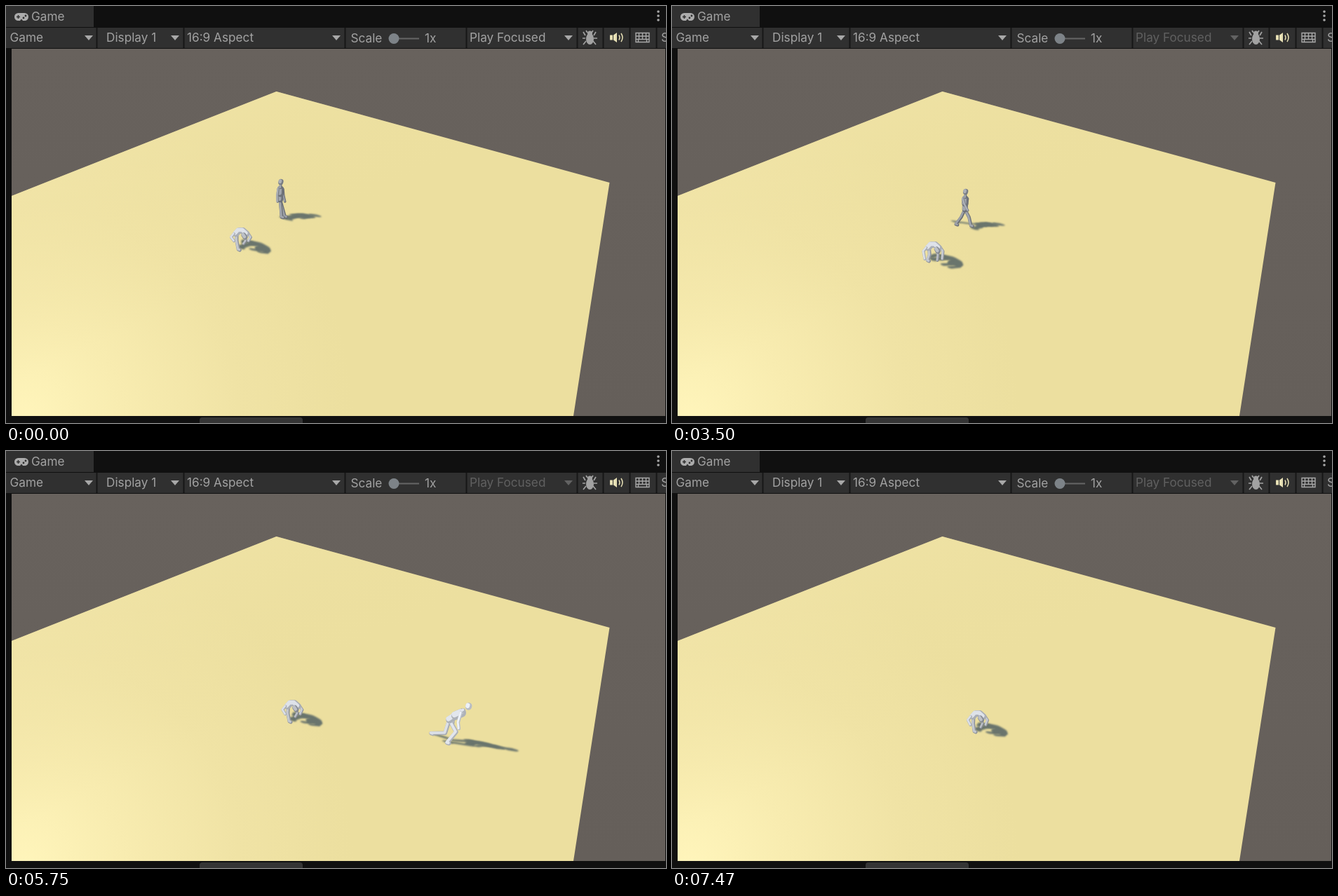
An HTML page with a canvas that plays this animation: 941x595 px, repeating every 7530 ms.

```html
<!DOCTYPE html>
<html lang="en">
<head>
<meta charset="utf-8">
<title>Game view</title>
<style>
html, body { margin: 0; width: 100%; height: 100%; overflow: hidden; background: #101010; }
svg, canvas { position: absolute; left: 0; top: 0; display: block; }
text { font: 17.2px Inter, Roboto, sans-serif; fill: #a2a2a2; }
</style>
</head>
<body>
<svg width="941" height="595" viewBox="0 0 941 595">
  <defs>
    <radialGradient id="sun" gradientUnits="userSpaceOnUse" cx="25" cy="590" r="470">
      <stop offset="0" stop-color="#fff5bb"/>
      <stop offset=".3" stop-color="#f8ecb0"/>
      <stop offset=".65" stop-color="#f0e3a5"/>
      <stop offset="1" stop-color="#ecdf9f"/>
    </radialGradient>
    <linearGradient id="haze" x1="0" y1="0" x2=".45" y2=".5">
      <stop offset="0" stop-color="#f4e8ae" stop-opacity=".8"/>
      <stop offset="1" stop-color="#ecdf9f" stop-opacity="0"/>
    </linearGradient>
    <linearGradient id="sky" x1="0" y1="0" x2="0" y2="1">
      <stop offset="0" stop-color="#68625d"/>
      <stop offset="1" stop-color="#655f5a"/>
    </linearGradient>
    <path id="arrow" d="M-6-3H6L0 4Z"/>
    <path id="floor" d="M8 270.900L385.500 122L860.500 252L809 585H8Z"/>
  </defs>

  <rect width="941" height="595" fill="#101010"/>
  <path d="M0 0H125V30H0Z" fill="#303030"/>
  <path d="M0 31H941V60H0Z" fill="#303030"/>
  <path d="M129.500 31V60M253.500 31V60M483.500 31V60M656.500 31V60M814.500 31V60M851.500 31V60M889.500 31V60M927.500 31V60" stroke="#171717" stroke-width="2"/>
  <rect x="276" y="587" width="147" height="14" rx="4" fill="#353535"/>

  <rect x="8" y="61" width="932" height="524" fill="url(#sky)"/>
  <use href="#floor" fill="url(#sun)"/>
  <use href="#floor" fill="url(#haze)"/>

  <text x="36" y="21">Game</text>
  <text x="5.500" y="51">Game</text>
  <text x="143" y="51">Display 1</text>
  <text x="258" y="51">16:9 Aspect</text>
  <text x="491.500" y="52">Scale</text>
  <text x="597" y="52">1x</text>
  <text x="934" y="51">S</text>
  <g fill="#a8a8a8">
    <use href="#arrow" x="118" y="45"/>
    <use href="#arrow" x="241" y="45"/>
    <use href="#arrow" x="471" y="45"/>
    <g id="play">
      <text x="661" y="51">Play Focused</text>
      <use href="#arrow" x="802" y="45"/>
    </g>
    <circle cx="930" cy="8" r="1.800"/>
    <circle cx="930" cy="14" r="1.800"/>
    <circle cx="930" cy="20" r="1.800"/>
  </g>
  <path d="M553 46.500H589" stroke="#666" stroke-width="2"/>
  <circle cx="553" cy="46.500" r="7.500" fill="#7d8388"/>

  <!-- gamepad -->
  <rect x="12" y="10" width="20" height="11" rx="5.500" fill="#acacac"/>
  <path d="M15 15.500H20M17.500 13V18" stroke="#303030" stroke-width="1.600"/>
  <circle cx="25" cy="17" r="1.400" fill="#303030"/>
  <circle cx="28" cy="14" r="1.400" fill="#303030"/>
  <path d="M19.500 21.500L22 18.500L24.500 21.500Z" fill="#303030"/>

  <!-- bug -->
  <g stroke="#a2a2a2" stroke-width="1.700" fill="none">
    <path d="M826 42L823 37M838 42L841 37M826 46H822M838 46H843M827 50L823 55M837 50L841 55M829 38L827 35M835 38L837 35"/>
    <ellipse cx="832.500" cy="47" rx="5.500" ry="8" fill="#a2a2a2" stroke="none"/>
    <circle cx="832.500" cy="39" r="3.500" fill="#a2a2a2" stroke="none"/>
  </g>

  <!-- speaker -->
  <path d="M861 41.500H865V48.500H861ZM866 41.500L871 38V52L866 48.500Z" fill="#e6dfb4"/>
  <path d="M874 41.500Q876 45 874 48.500M877 39Q881 45 877 51" fill="none" stroke="#e6dfb4" stroke-width="1.500"/>

  <!-- keyboard -->
  <path d="M898 38.500H917V51.500H898ZM898 43H917M898 47.500H917M902.500 38.500V47.500M907.500 38.500V47.500M912.500 38.500V47.500M901.500 47.500V51.500M913.500 47.500V51.500" fill="none" stroke="#a8a8a8" stroke-width="1.400"/>
</svg>
<canvas id="stage" width="941" height="595"></canvas>

<script>
const LOOP = 7530, START = 1160;
const ctx = document.getElementById('stage').getContext('2d');
const play = document.getElementById('play');
const floor = new Path2D(document.getElementById('floor').getAttribute('d'));
const { sin, cos, PI, max, min } = Math;

const mix = (a, b, k) => a + (b - a) * k;
const smooth = (a, b, t) => {
  const k = max(0, min(1, (t - a) / (b - a)));
  return k * k * (3 - 2 * k);
};
const grey = v => `rgb(${v},${v + 4},${v + 11})`;

// Runner's way over the floor: time, hip x, ground y
const route = [
  [0, 391, 303], [2700, 391, 303], [3440, 415, 314], [4270, 452, 332], [4980, 483, 347],
  [5220, 501, 355], [5750, 632, 418], [6230, 768, 483], [6520, 862, 530], [6850, 985, 590], [LOOP, 1300, 740]
];
function along(t) {
  const i = route.findIndex(p => p[0] > t);
  const a = route[i - 1], b = route[i], k = (t - a[0]) / (b[0] - a[0]);
  return [mix(a[1], b[1], k), mix(a[2], b[2], k)];
}

const part = (width, light, ...points) => ({ width, light, points });
const step = ([x, y], len, angle) => [x + len * sin(angle), y + len * cos(angle)];
const mid = (a, b) => [(a[0] + b[0]) / 2, (a[1] + b[1]) / 2];

function stroke(points, width, colour, dx = 0, dy = 0) {
  ctx.beginPath();
  points.forEach(([x, y]) => ctx.lineTo(x + dx, y + dy));
  ctx.lineWidth = width;
  ctx.strokeStyle = colour;
  ctx.stroke();
}

// The shadow is the body sheared onto the floor by the given matrix
function drawBody(parts, x, y, shear) {
  ctx.save();
  ctx.clip(floor);
  ctx.filter = 'blur(0.9px)';
  ctx.translate(x, y);
  ctx.transform(...shear);
  parts.forEach(p => stroke(p.points, p.width * 1.4, '#6a756d'));
  ctx.restore();

  ctx.save();
  ctx.translate(x, y);
  for (const { points, width, light } of parts) {
    stroke(points, width, grey(light - 52));
    stroke(points, width * .65, grey(light), -width * .15, -width * .12);
  }
  ctx.restore();
}

function runner(t) {
  const walk = smooth(2680, 3100, t), run = smooth(5000, 5600, t);
  const turns = (min(t, 5220) - 4270) / 760 + max(0, t - 5220) / 577;
  const phase = 2 * PI * turns + PI / 2;
  const swing = sin(phase) * walk;
  const dip = t > START && t < 2700 ? 2 * sin(PI * (t - START) / 1540) ** 2 : 0;
  const size = 1 + .6 * run, bulk = 1 + .3 * run;

  const leg = (side, stand) => {
    const s = side * swing;
    const lift = max(0, side * cos(phase)) * walk;
    const thigh = stand * (1 - walk) - .1 * run + (.45 + .8 * run) * s + .45 * lift;
    const knee = step([0, 0], 12.5 * size, thigh);
    const foot = step(knee, 12.5 * size, thigh - walk * .2 - run * .67 * (1 + s) - .8 * lift);
    return [[0, 0], knee, foot, [foot[0] + 2.5, foot[1] + .8]];
  };
  const legs = [leg(-1, .27), leg(1, .08)];
  const ground = max(legs[0][3][1], legs[1][3][1]);
  const drop = ([x, y]) => [x, y - ground];

  const lean = .03 + .95 * run;
  const hip = [0, -ground];
  const chest = step([-dip * .5, hip[1] + dip], 17 * (1 + .25 * run), PI - lean);
  const neck = step(chest, 3, PI - lean);
  const head = step(chest, 7.5 + 4 * run, PI - lean);
  const arm = (side, stand) => {
    const s = side * swing;
    const upper = stand - s * (.45 + .65 * run) - .7 * run;
    const top = [chest[0] + side * mix(3.5, 1, run), chest[1] + 2];
    const elbow = step(top, 9 * size, upper);
    return [top, elbow, step(elbow, 9, upper + .15 + run * (.6 + .7 * s))];
  };

  const tone = mix(162, 226, run);
  return [
    part(3.4 * bulk, tone - 8, ...arm(1, .08)),
    part(4.4 * bulk, tone - 6, ...legs[0].map(drop)),
    part(4.6 * bulk, tone, ...legs[1].map(drop)),
    part(8 * bulk, tone, hip, mid(hip, chest)),
    part(9.5 * bulk, tone, mid(hip, chest), [chest[0], chest[1] + 2]),
    part(4 * bulk, tone, chest, neck),
    part(7 * bulk, tone + 10, head, [head[0] + .4, head[1] - 1.5]),
    part(3.4 * bulk, tone + 12, ...arm(-1, -.12))
  ];
}

// Hunched figure: its middle leg stretches while the arms draw in
function croucher(t) {
  const p = (max(t, START) - START) / 1765;
  const u = .5 + .5 * cos(2 * PI * (p - .82));
  const sway = sin(2 * PI * p);
  const hand = mix(-6, -14, u);
  return [
    part(4, 186, [4, -20], [7, -12], [mix(6, 3, u), mix(-4, -9, u)]),
    part(5, 196, [-6, -22], [-6 + sway, -12], [mix(-8, -2, u), mix(-4, 2, u)], [mix(-6, 0, u), mix(-3, 3, u)]),
    part(4, 200, [10, -23], [14, -17], [mix(13, 10, u), hand]),
    part(9, 222, [-7, -22], [-3, -26.5], [3, -26.5], [8, -22]),
    part(7, 188, [4 + sway, -20], [6 + sway, -17]),
    part(4, 220, [-10, -22], [-14, -17], [mix(-12, -9, u), hand])
  ];
}

function draw(now) {
  const t = now % LOOP;
  play.setAttribute('opacity', t < 850 ? 1 : .42);
  ctx.clearRect(0, 0, 941, 595);
  ctx.save();
  ctx.beginPath();
  ctx.rect(8, 61, 932, 524);
  ctx.clip();
  ctx.lineCap = ctx.lineJoin = 'round';

  const [x, y] = along(t);
  if (x < 1000) drawBody(runner(t), x, y - 1, [1.35, .447, -.95, .05, 0, -1]);

  const k = max(0, t - START) / 6310;
  drawBody(croucher(t), mix(335, 436, k), mix(347, 401, k), [1.1, .6, -.95, .15, 4, -1]);
  ctx.restore();
}

const begin = performance.now();
function tick() {
  draw(performance.now() - begin);
  requestAnimationFrame(tick);
}
tick();
</script>
</body>
</html>
```
